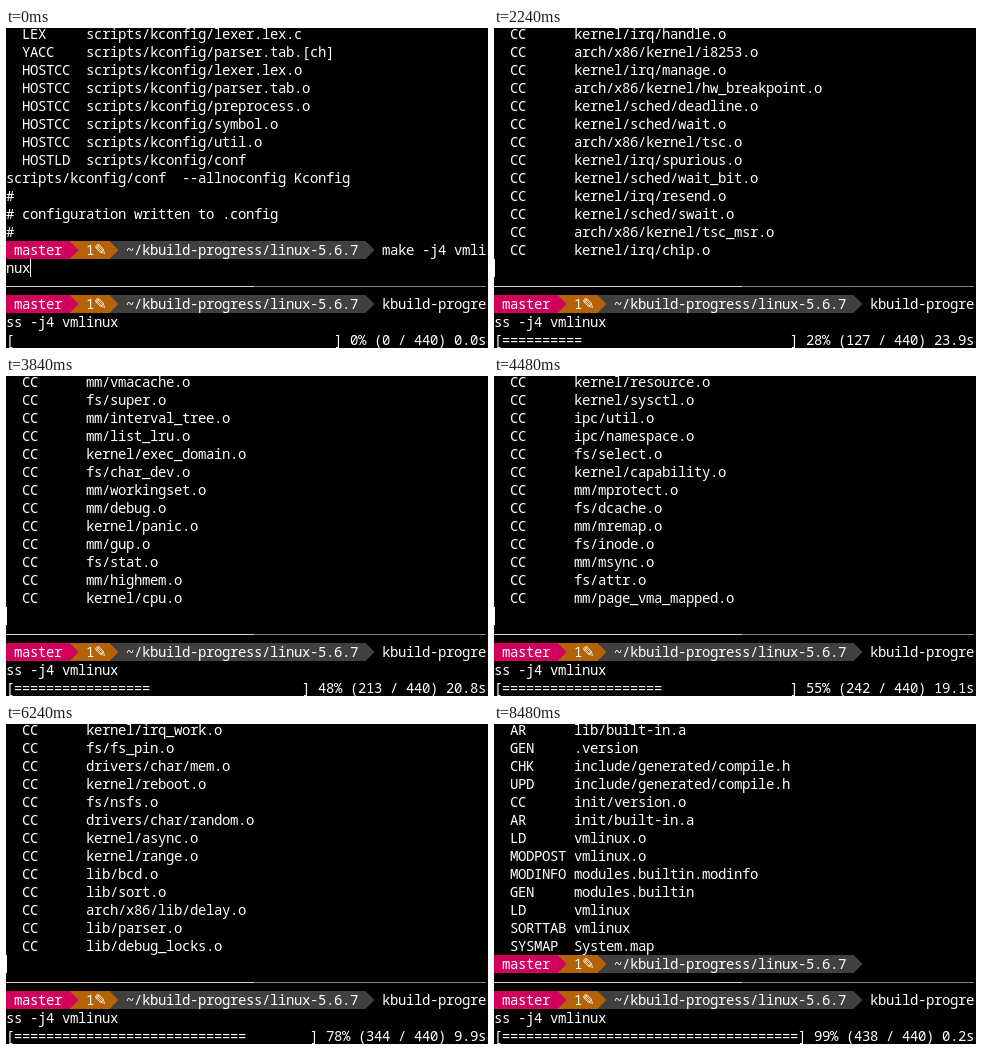
An HTML page for the animation above (8.8 s loop, 482 by 320 pixels).

```html
<!DOCTYPE html>
<html lang="en">
<head>
<meta charset="utf-8">
<title>Build progress</title>
<style>
html, body { margin: 0; width: 100%; height: 100%; overflow: hidden; background: #000; }
/* Terminal grid of 8 by 18 px cells */
#screen {
  position: absolute; left: 0; top: -3px; width: 482px; height: 324px; overflow: hidden;
  font: 14px/18px "Noto Sans Mono", "DejaVu Sans Mono", monospace; letter-spacing: -0.4px;
  font-variant-ligatures: none; color: #fff; white-space: pre;
}
#screen div { height: 18px; }
.seg, .tip { display: inline-block; height: 18px; vertical-align: top; background: var(--a); }
.tip {
  width: 8px;
  background:
    linear-gradient(to top right, var(--a) 50%, var(--b) 50%) top / 100% 50% no-repeat,
    linear-gradient(to bottom right, var(--a) 50%, var(--b) 50%) bottom / 100% 50% no-repeat;
}
.pen { font: 15px/0 "DejaVu Sans", sans-serif; }
.cursor { display: inline-block; width: 1px; height: 18px; vertical-align: top; background: #fff; }
.rule { height: 1px !important; margin: 9px 0 8px; width: 480px;
  background: linear-gradient(90deg, #d8d8d8 248px, #808080 248px); }
</style>
</head>
<body>
<div id="screen"></div>
<script>
const STEP = 160, LOOP = 8800, ROWS = 13, COLS = 60, TOTAL = 440;
const screen = document.getElementById('screen');

// Shell prompt
const colors = ['#d2005d', '#b36205', '#404040', '#000'];
const labels = [
  [' master ', 64],
  [' 1<span class="pen">✎</span>', 32],
  [' ~/kbuild-progress/linux-5.6.7 ', 248],
];
const prompt = labels.map(([text, width], i) => {
  const vars = `--a:${colors[i]};--b:${colors[i + 1]}`;
  return `<span class="seg" style="${vars};width:${width}px">${text}</span>` +
    `<span class="tip" style="${vars}"></span>`;
}).join('');

// Build log
const log = [];
const marks = [];
const put = (tag, path) => log.push('  ' + tag.padEnd(8) + path);
const lines = text => text.trim().split('\n').forEach(s => put(...s.trim().split(' ')));
const mark = () => marks.push(log.length);

let seed = 7;
const random = n => (seed = (seed * 16807) % 2147483647) % n;

// Compile lines from several directories, mixed as parallel jobs do
function mix(count, groups) {
  const dirs = Object.entries(groups).map(([dir, names]) => ({ dir, names: names.split(' '), i: 0 }));
  while (count--) {
    const d = dirs[random(dirs.length)];
    put('CC', d.dir + d.names[d.i++ % d.names.length] + '.o');
  }
}

lines(`LEX scripts/kconfig/lexer.lex.c
  YACC scripts/kconfig/parser.tab.[ch]
  HOSTCC scripts/kconfig/lexer.lex.o
  HOSTCC scripts/kconfig/parser.tab.o
  HOSTCC scripts/kconfig/preprocess.o
  HOSTCC scripts/kconfig/symbol.o
  HOSTCC scripts/kconfig/util.o
  HOSTLD scripts/kconfig/conf`);
log.push('scripts/kconfig/conf  --allnoconfig Kconfig', '#', '# configuration written to .config', '#');
log.push(prompt + ' make -j4 vmli');
mark();

log.push('nux');
lines(`SYSTBL arch/x86/include/generated/asm/syscalls_32.h
  SYSHDR arch/x86/include/generated/uapi/asm/unistd_32.h
  SYSHDR arch/x86/include/generated/uapi/asm/unistd_64.h
  HOSTCC arch/x86/tools/relocs_32.o
  HOSTCC arch/x86/tools/relocs_64.o
  HOSTCC arch/x86/tools/relocs_common.o
  WRAP arch/x86/include/generated/uapi/asm/errno.h
  WRAP arch/x86/include/generated/uapi/asm/fcntl.h
  WRAP arch/x86/include/generated/uapi/asm/ioctl.h
  WRAP arch/x86/include/generated/uapi/asm/poll.h
  UPD include/config/kernel.release
  UPD include/generated/uapi/linux/version.h
  UPD include/generated/utsrelease.h
  HOSTLD arch/x86/tools/relocs
  CC scripts/mod/empty.o
  HOSTCC scripts/mod/mk_elfconfig
  CC scripts/mod/devicetable-offsets.s
  MKELF scripts/mod/elfconfig.h
  HOSTCC scripts/mod/modpost.o
  HOSTCC scripts/mod/sumversion.o
  HOSTLD scripts/mod/modpost
  CC kernel/bounds.s
  UPD include/generated/bounds.h
  CC arch/x86/kernel/asm-offsets.s
  UPD include/generated/asm-offsets.h
  CALL scripts/checksyscalls.sh
  CC init/main.o
  CC init/do_mounts.o
  CC arch/x86/events/core.o
  CC arch/x86/events/probe.o
  CC arch/x86/kernel/fpu/init.o
  CC arch/x86/kernel/fpu/bugs.o
  CC arch/x86/kernel/cpu/scattered.o
  CC arch/x86/kernel/fpu/core.o
  CC arch/x86/kernel/cpu/topology.o
  CC arch/x86/kernel/cpu/common.o
  CC arch/x86/events/intel/knc.o
  CC arch/x86/kernel/cpu/rdrand.o
  CC arch/x86/kernel/cpu/match.o
  CC arch/x86/kernel/fpu/regset.o
  CC arch/x86/kernel/cpu/bugs.o
  CC arch/x86/events/intel/lbr.o
  CC arch/x86/kernel/cpu/aperfmperf.o
  CC arch/x86/kernel/fpu/signal.o`);
mark();

mix(99, {
  'arch/x86/kernel/': 'process_32 signal traps irq irq_32 dumpstack time ioport ldt setup x86_init ' +
    'nmi ebda platform-quirks e820 pci-dma quirks topology kdebugfs alternative tsc_sync rtc process ptrace',
  'arch/x86/kernel/cpu/': 'cpuid-deps umwait proc capflags powerflags intel amd hygon centaur perfctr-watchdog',
  'arch/x86/mm/': 'init init_32 fault ioremap extable pageattr mmap pgtable physaddr setup_nx tlb cpu_entry_area',
  'kernel/': 'fork softirq resource sysctl capability ptrace user signal sys umh workqueue pid ' +
    'task_work extable params kthread',
  'kernel/sched/': 'core loadavg clock cputime idle fair rt',
  'kernel/locking/': 'mutex semaphore rwsem percpu-rwsem',
});
lines(`CC kernel/irq/handle.o
  CC arch/x86/kernel/i8253.o
  CC kernel/irq/manage.o
  CC arch/x86/kernel/hw_breakpoint.o
  CC kernel/sched/deadline.o
  CC kernel/sched/wait.o
  CC arch/x86/kernel/tsc.o
  CC kernel/irq/spurious.o
  CC kernel/sched/wait_bit.o
  CC kernel/irq/resend.o
  CC kernel/sched/swait.o
  CC arch/x86/kernel/tsc_msr.o
  CC kernel/irq/chip.o`);
mark();

mix(73, {
  'kernel/irq/': 'dummychip devres autoprobe irqdomain proc matrix msi',
  'kernel/time/': 'time timer hrtimer timekeeping ntp clocksource jiffies timer_list timeconv ' +
    'timecounter alarmtimer clockevents tick-common',
  'kernel/rcu/': 'update sync srcutiny tiny',
  'kernel/': 'notifier ksysfs cred reboot async range smpboot ucount groups dma iomem up',
  'mm/': 'filemap mempool oom_kill fadvise maccess page-writeback readahead swap truncate vmscan shmem ' +
    'util mmzone vmstat backing-dev mm_init percpu slab_common compaction memory mincore mlock mmap ' +
    'mprotect mremap msync rmap vmalloc page_alloc memblock slob',
});
lines(`CC mm/vmacache.o
  CC fs/super.o
  CC mm/interval_tree.o
  CC mm/list_lru.o
  CC kernel/exec_domain.o
  CC fs/char_dev.o
  CC mm/workingset.o
  CC mm/debug.o
  CC kernel/panic.o
  CC mm/gup.o
  CC fs/stat.o
  CC mm/highmem.o
  CC kernel/cpu.o`);
mark();

mix(53, {
  'mm/': 'memory mincore mlock mmap mmu_gather mprotect mremap msync page_vma_mapped pagewalk',
  'fs/': 'exec pipe namei fcntl ioctl readdir select dcache inode attr open read_write file_table',
  'kernel/': 'exit softirq resource sysctl capability ptrace user signal sys umh workqueue pid task_work',
  'ipc/': 'util namespace syscall',
});
lines(`CC kernel/sys_ni.o
  CC kernel/nsproxy.o
  CC fs/bad_inode.o
  CC fs/file.o
  CC fs/filesystems.o
  CC kernel/notifier.o
  CC fs/namespace.o
  AR mm/built-in.a
  AR ipc/built-in.a
  CC security/commoncap.o
  CC kernel/ksysfs.o
  CC security/min_addr.o
  CC kernel/cred.o`);
mark();

mix(60, {
  'fs/': 'seq_file xattr libfs fs-writeback pnode splice sync utimes d_path stack fs_struct statfs ' +
    'fs_pin nsfs fs_types fs_context fs_parser buffer block_dev mpage',
  'kernel/': 'reboot async range smpboot ucount groups irq_work',
  'drivers/base/': 'component core bus dd syscore driver class platform cpu firmware init map devres ' +
    'attribute_container transport_class topology container property cacheinfo swnode',
  'drivers/char/': 'mem random misc',
});
mix(58, {
  'lib/': 'bcd sort parser debug_locks random32 bust_spinlocks kasprintf bitmap scatterlist list_sort uuid ' +
    'iov_iter clz_ctz bsearch find_bit llist memweight kfifo percpu-refcount rhashtable once refcount ' +
    'usercopy errseq bucket_locks generic-radix-tree string_helpers hexdump kstrtox iomap pci_iomap ' +
    'argv_split bug cmdline ctype dec_and_lock decompress dump_stack extable idr klist kobject',
  'arch/x86/lib/': 'delay misc cmdline cpu usercopy insn inat getuser',
});
lines(`AR lib/lib.a
  EXPORTS lib/lib-ksyms.o
  AR lib/built-in.a
  GEN .version
  CHK include/generated/compile.h
  UPD include/generated/compile.h
  CC init/version.o
  AR init/built-in.a
  LD vmlinux.o
  MODPOST vmlinux.o
  MODINFO modules.builtin.modinfo
  GEN modules.builtin
  LD vmlinux`);
mark();

lines(`SORTTAB vmlinux
  SYSMAP System.map`);
mark();

// Timeline
const END = 7840;
const logTimes = [0, 960, 2240, 3840, 5280, 7200, END];
const counts = [0, 15, 127, 213, 279, 410, 438];
const leftTimes = [0, 960, 1120, 2240, 3840, 5280, 7200, END];
const lefts = [0, 0, 26.4, 23.9, 20.8, 17, 2.9, 0.2];

function at(t, xs, ys) {
  let i = 0;
  while (i < xs.length - 2 && t >= xs[i + 1]) i++;
  return ys[i] + (ys[i + 1] - ys[i]) * (t - xs[i]) / (xs[i + 1] - xs[i]);
}

function progress(t) {
  const done = Math.floor(at(t, logTimes, counts));
  const left = at(t, leftTimes, lefts).toFixed(1);
  const tail = `] ${Math.floor(done / TOTAL * 100)}% (${done} / ${TOTAL}) ${left}s`;
  const width = COLS - 1 - tail.length;
  return '[' + '='.repeat(Math.round(done / TOTAL * width)).padEnd(width) + tail;
}

function render(t) {
  const n = Math.floor(at(t, logTimes, marks));
  const cursor = '<span class="cursor"></span>';
  const current = t === 0 ? 'nux' + cursor : t === END ? prompt : cursor;
  const row = s => `<div>${s}</div>`;
  screen.innerHTML = [...log.slice(n - ROWS, n), current].map(row).join('') +
    '<div class="rule"></div>' +
    [prompt + ' kbuild-progre', 'ss -j4 vmlinux', progress(t)].map(row).join('');
}

let shown = -1;
const start = performance.now();
function frame() {
  const ms = (performance.now() - start) % LOOP;
  const t = Math.min(END, Math.floor(ms / STEP) * STEP);
  if (t !== shown) render(shown = t);
  requestAnimationFrame(frame);
}
frame();
</script>
</body>
</html>
```
